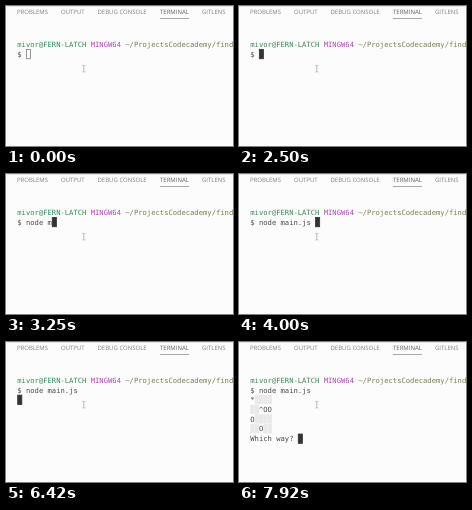
Write an HTML page that moves like this. It is 227 px wide and 140 px high and loops after 8000 ms.

```html
<!DOCTYPE html>
<html>
<head>
<meta charset="utf-8">
<style>
html, body { margin: 0; width: 100%; height: 100%; overflow: hidden; background: #fdfcfd; }
svg { display: block; width: 227px; height: 140px; }
text { white-space: pre; text-rendering: geometricPrecision; }
.tabs { font: 6px "Open Sans", "Noto Sans", sans-serif; fill: #808080; }
.term { font: 7.18px "DejaVu Sans Mono", monospace; fill: #4a4a4a; }
</style>
</head>
<body>
<svg viewBox="0 0 227 140">
  <rect width="227" height="1" fill="#e2e2e2"/>
  <g class="tabs">
    <text x="11" y="7.6">PROBLEMS</text>
    <text x="55" y="7.6">OUTPUT</text>
    <text x="91.5" y="7.6">DEBUG CONSOLE</text>
    <text x="154" y="7.6" fill="#606060">TERMINAL</text>
    <text x="196" y="7.6">GITLENS</text>
  </g>
  <rect x="154" y="12" width="29" height="1" fill="#a8a8a8"/>
  <g class="term">
    <text x="11.3" y="40.8"><tspan fill="#388a55">mivor@FERN-LATCH</tspan> <tspan fill="#b840b8">MINGW64</tspan> <tspan fill="#7c7e48">~/ProjectsCodecademy/find</tspan></text>
    <text id="command" x="11.3" y="50.5"></text>
    <g id="output"></g>
  </g>
  <rect id="cursor" stroke-width=".8"/>
  <path d="M76.3 59.5h1l.5.5.5-.5h1M77.8 60v5.5M76.3 66h1l.5-.5.5.5h1" fill="none" stroke="#a0a0a0" stroke-width=".7"/>
</svg>
<script>
const LOOP = 8000, LEFT = 11.3, TOP = 40.8, CHAR = 4.323, LINE = 9.72;
const FOCUS = 1580, ENTER = 6080, REPLY = 6580;
const field = ["*░░░░", "░░^OO", "O░░░░", "░░O░░"];
const question = "Which way? ";
// Each entry: time in ms, text on the command line; the last one is a tab completion.
const typed = [
  [0, ""], [2580, "n"], [2670, "no"], [2750, "nod"], [2830, "node"],
  [3000, "node "], [3170, "node m"], [3330, "node ma"], [3500, "node mai"],
  [3750, "node main.js "]
];
const find = id => document.getElementById(id);
const command = find("command"), output = find("output"), cursor = find("cursor");

function setAll(el, attrs) {
  for (const key in attrs) el.setAttribute(key, attrs[key]);
}

function add(tag, attrs, content = "") {
  const el = document.createElementNS("http://www.w3.org/2000/svg", tag);
  setAll(el, attrs);
  el.textContent = content;
  output.append(el);
}

[...field, question].forEach((line, i) => {
  const y = TOP + (i + 2) * LINE;
  [...line].forEach((c, col) => {
    if (c === "░") add("rect", {
      x: LEFT + col * CHAR, y: y - 7.3, width: CHAR, height: LINE - .5, fill: "#e9e9e9"
    });
  });
  add("text", { x: LEFT, y }, line.replace(/░/g, " "));
});

function placeCursor(col, row, filled) {
  setAll(cursor, {
    x: LEFT + col * CHAR + .4,
    y: TOP + row * LINE - 7.1,
    width: CHAR - .2,
    height: LINE - .4,
    fill: filled ? "#333" : "none",
    stroke: filled ? "#333" : "#808080"
  });
}

function draw() {
  const t = performance.now() % LOOP;
  const line = "$ " + typed.filter(([start]) => start <= t).pop()[1];
  command.textContent = line;
  output.style.display = t < REPLY ? "none" : "";
  if (t < ENTER) placeCursor(line.length, 1, t >= FOCUS);
  else if (t < REPLY) placeCursor(0, 2, true);
  else placeCursor(question.length, 6, true);
  requestAnimationFrame(draw);
}
draw();
</script>
</body>
</html>
```
